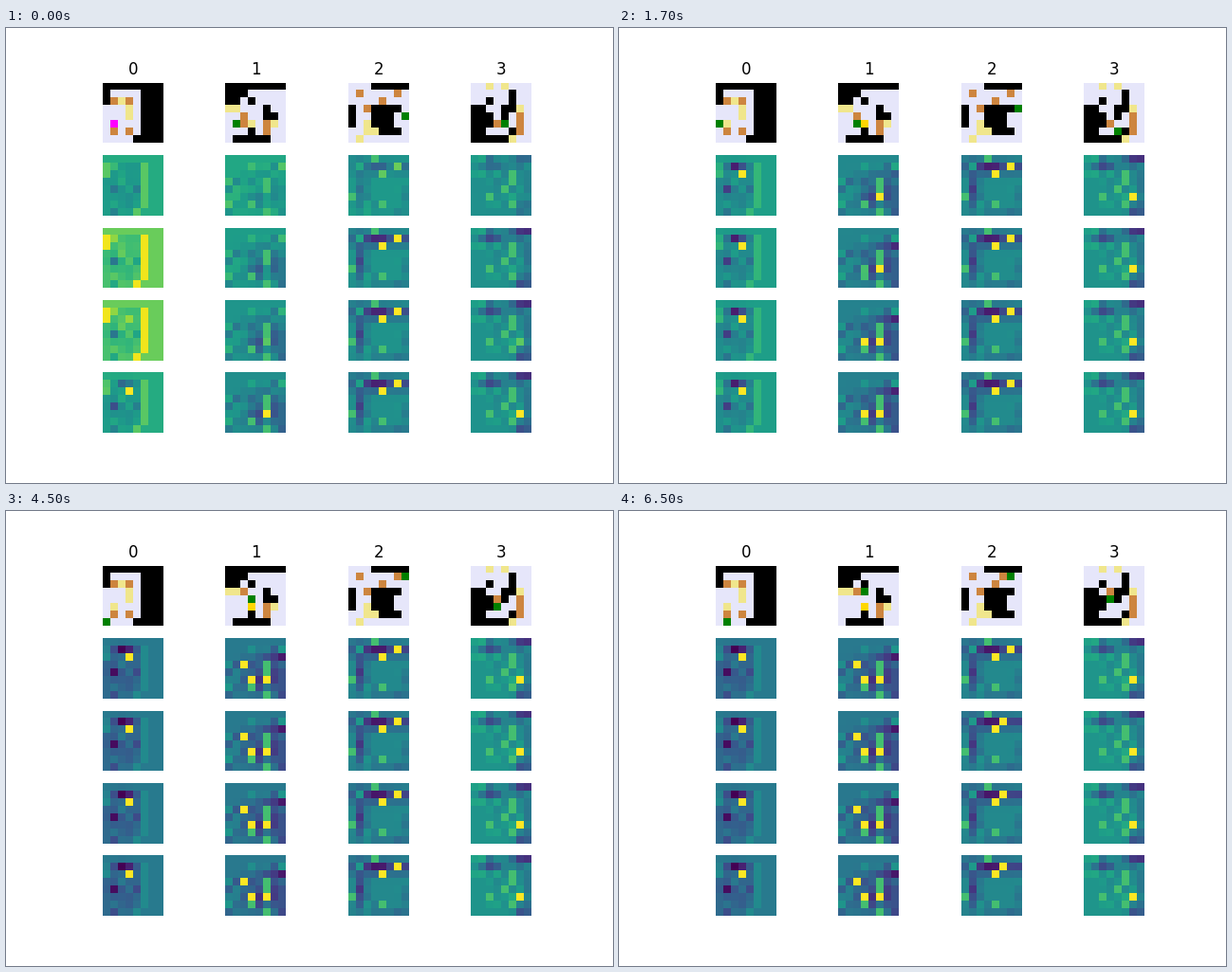
Animation, 640 px wide and 480 px high, one loop 8 s. Source, as a matplotlib script:

```python
import numpy as np
import matplotlib.pyplot as plt
from matplotlib.animation import FuncAnimation
from matplotlib.colors import to_rgb

SIZE = 8
STEPS_PER_MOVE = 4
MOVES = {"L": (-1, 0), "R": (1, 0), "U": (0, -1), "D": (0, 1)}
Y, X = np.mgrid[:SIZE, :SIZE]

# Walls are rectangles: x, y, width, height.
LEVELS = [
    dict(walls=[(0, 0, 8, 1), (0, 1, 1, 2), (5, 1, 3, 7), (4, 7, 1, 1)],
         targets=[(2, 2), (3, 3), (3, 4), (1, 5)],
         boxes=[(1, 2), (3, 2), (1, 6), (3, 6)], agent=(1, 5), path="LDDR"),
    dict(walls=[(0, 0, 8, 1), (0, 1, 3, 1), (0, 2, 2, 1), (3, 2, 1, 1),
                (5, 3, 1, 1), (5, 4, 2, 1), (3, 6, 1, 1), (1, 7, 5, 1)],
         targets=[(0, 3), (1, 3), (3, 5), (6, 5)],
         boxes=[(2, 4), (2, 5), (5, 5), (5, 6)], agent=(1, 5), path="RURU"),
    dict(walls=[(3, 0, 5, 1), (0, 3, 1, 3), (3, 3, 4, 1), (3, 4, 3, 2),
                (4, 6, 3, 1)],
         targets=[(2, 5), (2, 6), (3, 6), (1, 7)],
         boxes=[(1, 1), (6, 1), (4, 2), (2, 3)], agent=(7, 4), path="UUUL"),
    dict(walls=[(5, 1, 1, 3), (2, 2, 1, 1), (4, 3, 1, 2), (0, 3, 2, 1),
                (0, 4, 3, 2), (0, 6, 2, 1), (5, 6, 1, 1), (0, 7, 5, 1)],
         targets=[(2, 0), (4, 0), (6, 3), (5, 7)],
         boxes=[(3, 5), (6, 4), (6, 5), (6, 6)], agent=(4, 5), path="DLUU"),
]

# What the network sees in each level. The background eases from "early" to
# "settled"; dips are (x, y, x radius, y radius, depth, first step); focus maps
# a box index to the step at which it lights up; glow lists lesser highlights.
FIELDS = [
    dict(early=.56, settled=.41, floor=-.07, noise=.04,
         dips=[(2, 1, 1.3, .6, .42, 3), (1, 4, .8, .8, .33, 0)],
         focus={1: 2}, glow=[]),
    dict(early=.6, settled=.4, floor=0, noise=.06,
         dips=[(5, 4.5, 2.6, 2, .27, 0), (7, 2, 2, .6, .33, 4),
               (7, 6.5, 1.2, 1, .25, 0)],
         focus={0: 9, 1: 5, 2: 2}, glow=[(5, 3), (5, 4), (3, 6), (5, 7)]),
    dict(early=.54, settled=.47, floor=0, noise=.04,
         dips=[(3.5, 1.1, 4.5, .9, .37, 0), (1, 4, .5, 2.5, .3, 0),
               (4, 7, 9, .4, .1, 0)],
         focus={1: 0, 2: 0}, glow=[(3, 0), (0, 5), (4, 6)]),
    dict(early=.5, settled=.52, floor=0, noise=.05,
         dips=[(7, 0, 2.5, .9, .45, 0), (6.5, 7, .9, .8, .4, 0),
               (2, 1, 1.3, .6, .3, 0), (7, 3, 1, 4, .13, 0)],
         focus={2: 2}, glow=[(5, 2), (5, 3), (2, 5), (4, 4), (5, 6)]),
]


def wall_mask(level):
    mask = np.zeros((SIZE, SIZE), bool)
    for x, y, w, h in level["walls"]:
        mask[y:y + h, x:x + w] = True
    return mask


def play(level, turn):
    """Agent and boxes after the given number of moves."""
    (x, y), boxes = level["agent"], list(level["boxes"])
    for move in level["path"][:turn]:
        dx, dy = MOVES[move]
        x, y = x + dx, y + dy
        if (x, y) in boxes:
            boxes[boxes.index((x, y))] = (x + dx, y + dy)
    return (x, y), boxes


def board(level, turn):
    agent, boxes = play(level, turn)
    targets = level["targets"]
    image = np.full((SIZE, SIZE, 3), to_rgb("lavender"))
    image[wall_mask(level)] = to_rgb("black")

    def paint(cells, color):
        for x, y in cells:
            image[y, x] = to_rgb(color)

    paint(targets, "khaki")
    paint(boxes, "peru")
    paint(set(boxes) & set(targets), "gold")
    paint([agent], "magenta" if agent in targets else "green")
    return image


def ramp(step, start, length=2):
    return np.clip((step - start + 1) / length, 0, 1)


def background(column, step):
    field = FIELDS[column]
    if column:
        fade = np.exp(-step / 4)
        return field["settled"] + (field["early"] - field["settled"]) * fade
    # The first level surges at once and drops after its second move.
    if step > 2 * STEPS_PER_MOVE:
        return field["settled"]
    return field["early"] + .25 * np.exp(-(step - 1.5) ** 2 / 1.5)


def activation(column, step):
    level, field = LEVELS[column], FIELDS[column]
    walls = wall_mask(level)
    base = background(column, step)
    # The maps react to each move one step late.
    _, boxes = play(level, max(step - 1, 0) // STEPS_PER_MOVE)

    noise = np.random.default_rng(column + 3).normal(
        field["floor"], field["noise"], (SIZE, SIZE))
    grid = base + np.where(walls, 0, noise)
    if column == 0:
        opened = np.pad(~walls, ((0, 0), (1, 1)))
        rim = walls & (opened[:, :-2] | opened[:, 2:])
        grid[rim] += .07 + .5 * max(0, base - .5)

    dip = np.zeros((SIZE, SIZE))
    for x, y, rx, ry, depth, start in field["dips"]:
        shape = np.exp(-((X - x) / rx) ** 2 - ((Y - y) / ry) ** 2)
        dip = np.maximum(dip, depth * shape * ramp(step, start))
    for x, y in boxes:
        dip[y, x] = 0
    grid -= dip

    for x, y in field["glow"]:
        grid[y, x] = .7
    for index, start in field["focus"].items():
        x, y = boxes[index]
        grid[y, x] += (1 - grid[y, x]) * ramp(step, start)
    return np.clip(grid, 0, 1)


def panel(row, column, turn):
    if row == 0:
        return board(LEVELS[column], turn)
    return activation(column, STEPS_PER_MOVE * turn + row - 1)


fig, axes = plt.subplots(5, 4, figsize=(6.4, 4.8), dpi=100)
images = {}
for (row, column), ax in np.ndenumerate(axes):
    ax.set_axis_off()
    images[row, column] = ax.imshow(panel(row, column, 0), cmap="viridis",
                                    vmin=0, vmax=1)
    if row == 0:
        ax.set_title(str(column))


def update(frame):
    turn = (frame + 3) // 4
    for (row, column), image in images.items():
        image.set_data(panel(row, column, turn))
    return list(images.values())


anim = FuncAnimation(fig, update, frames=16, interval=500, repeat=True,
                     repeat_delay=0)
plt.show()
```
